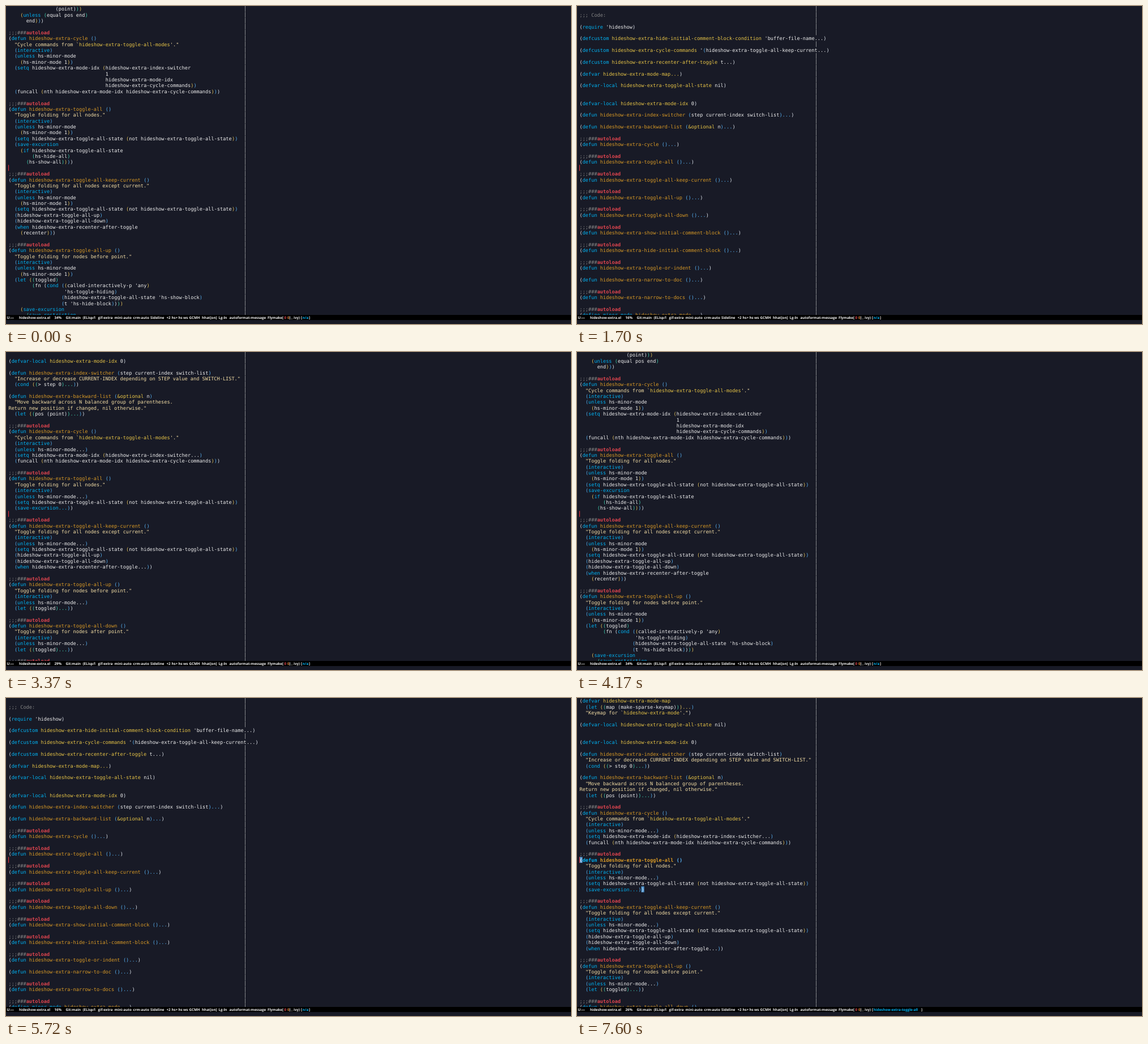
Write an HTML page that moves like this. It is 998x561 px and loops after 8 s.

```html
<!DOCTYPE html>
<html lang="en">
<head>
<meta charset="utf-8">
<title>Code folding</title>
<style>
html, body { margin: 0; width: 100%; height: 100%; overflow: hidden; background: #181a26; }
svg { display: block; width: 998px; height: 561px; }
text { white-space: pre; text-rendering: geometricPrecision; }
.code { font: 8.62px "DejaVu Sans Mono", "Noto Sans Mono", monospace; }
.mode { font: bold 6.2px "Open Sans", "Noto Sans", sans-serif; }
.bold { font-weight: bold; }
</style>
</head>
<body>
<svg id="stage" viewBox="0 0 998 561"></svg>
<script>
const CW = 5.19, LH = 10.385, X0 = 4.5, BASE = 8.4, ROWS = 53, LIMIT = 80;
const C = {
  text: '#eeeeee', key: '#00b3f4', fn: '#d99a26', name: '#e8c547', str: '#f5dfa6',
  note: '#858585', red: '#e0454f', match: '#4d94cf', rule: '#85888c'
};
const PARENS = ['#e2e8f0', '#58b2f4', '#e8c65c', '#3fd0ae'];
const KEYS = new Set(('defun defvar defvar-local defcustom define-minor-mode require interactive ' +
  'unless setq if let when cond save-excursion save-restriction').split(' '));

// In the listings "@" is the package prefix and "#" an autoload cookie line.
const listing = s => s.split('\n').map(l => l === '#' ? ';;;###autoload' : l.replace(/@/g, 'hideshow-extra'));

const full = listing(`                (point)))
    (unless (equal pos end)
      end)))

#
(defun @-cycle ()
  "Cycle commands from \`@-toggle-all-modes'."
  (interactive)
  (unless hs-minor-mode
    (hs-minor-mode 1))
  (setq @-mode-idx (@-index-switcher
                                 1
                                 @-mode-idx
                                 @-cycle-commands))
  (funcall (nth @-mode-idx @-cycle-commands)))

#
(defun @-toggle-all ()
  "Toggle folding for all nodes."
  (interactive)
  (unless hs-minor-mode
    (hs-minor-mode 1))
  (setq @-toggle-all-state (not @-toggle-all-state))
  (save-excursion
    (if @-toggle-all-state
        (hs-hide-all)
      (hs-show-all))))

#
(defun @-toggle-all-keep-current ()
  "Toggle folding for all nodes except current."
  (interactive)
  (unless hs-minor-mode
    (hs-minor-mode 1))
  (setq @-toggle-all-state (not @-toggle-all-state))
  (@-toggle-all-up)
  (@-toggle-all-down)
  (when @-recenter-after-toggle
    (recenter)))

#
(defun @-toggle-all-up ()
  "Toggle folding for nodes before point."
  (interactive)
  (unless hs-minor-mode
    (hs-minor-mode 1))
  (let ((toggled)
        (fn (cond ((called-interactively-p 'any)
                   'hs-toggle-hiding)
                  (@-toggle-all-state 'hs-show-block)
                  (t 'hs-hide-block))))
    (save-excursion
      (save-restriction`);

const folded = listing(`
;;; Code:

(require 'hideshow)

(defcustom @-hide-initial-comment-block-condition 'buffer-file-name...)

(defcustom @-cycle-commands '(@-toggle-all-keep-current...)

(defcustom @-recenter-after-toggle t...)

(defvar @-mode-map...)

(defvar-local @-toggle-all-state nil)


(defvar-local @-mode-idx 0)

(defun @-index-switcher (step current-index switch-list)...)

(defun @-backward-list (&optional n)...)

#
(defun @-cycle ()...)

#
(defun @-toggle-all ()...)

#
(defun @-toggle-all-keep-current ()...)

#
(defun @-toggle-all-up ()...)

#
(defun @-toggle-all-down ()...)

#
(defun @-show-initial-comment-block ()...)

#
(defun @-hide-initial-comment-block ()...)

#
(defun @-toggle-or-indent ()...)

(defun @-narrow-to-doc ()...)

#
(defun @-narrow-to-docs ()...)

#
(define-minor-mode @-mode...)`);

const partial = listing(`(defvar @-mode-map
  (let ((map (make-sparse-keymap)))...)
  "Keymap for \`@-mode'.")

(defvar-local @-toggle-all-state nil)


(defvar-local @-mode-idx 0)

(defun @-index-switcher (step current-index switch-list)
  "Increase or decrease CURRENT-INDEX depending on STEP value and SWITCH-LIST."
  (cond ((> step 0)...))

(defun @-backward-list (&optional n)
  "Move backward across N balanced group of parentheses.
Return new position if changed, nil otherwise."
  (let ((pos (point))...))

#
(defun @-cycle ()
  "Cycle commands from \`@-toggle-all-modes'."
  (interactive)
  (unless hs-minor-mode...)
  (setq @-mode-idx (@-index-switcher...)
  (funcall (nth @-mode-idx @-cycle-commands)))

#
(defun @-toggle-all ()
  "Toggle folding for all nodes."
  (interactive)
  (unless hs-minor-mode...)
  (setq @-toggle-all-state (not @-toggle-all-state))
  (save-excursion...))

#
(defun @-toggle-all-keep-current ()
  "Toggle folding for all nodes except current."
  (interactive)
  (unless hs-minor-mode...)
  (setq @-toggle-all-state (not @-toggle-all-state))
  (@-toggle-all-up)
  (@-toggle-all-down)
  (when @-recenter-after-toggle...))

#
(defun @-toggle-all-up ()
  "Toggle folding for nodes before point."
  (interactive)
  (unless hs-minor-mode...)
  (let ((toggled)...))

#
(defun @-toggle-all-down ()
  "Toggle folding for nodes after point."
  (interactive)
  (unless hs-minor-mode...)
  (let ((toggled)...))

#`);

const SVG = 'http://www.w3.org/2000/svg';
function add(parent, tag, attrs, text) {
  const el = document.createElementNS(SVG, tag);
  for (const k in attrs) el.setAttribute(k, attrs[k]);
  if (text) el.textContent = text;
  return parent.appendChild(el);
}
const rect = (g, x, y, width, height, fill) => add(g, 'rect', { x, y, width, height, fill });
const paren = depth => PARENS[depth % PARENS.length];

// Returns a function that splits successive lines into [column, text, colour, bold].
function highlighter(depth) {
  let inString = false;
  return line => {
    const out = [];
    let last = C.text, word = '';
    const put = (col, s, color, bold) => { out.push([col, s, color, bold]); last = color; };
    if (line.startsWith(';;;')) {
      const at = line.indexOf('autoload');
      put(0, at < 0 ? line : line.slice(0, at), C.note);
      if (at > 0) put(at, 'autoload', C.red, true);
      return out;
    }
    if (line[0] === '(') depth = 0;
    for (let i = 0; i < line.length;) {
      const rest = line.slice(i);
      let s;
      if (inString || rest[0] === '"') {
        const end = rest.indexOf('"', inString ? 0 : 1);
        s = end < 0 ? rest : rest.slice(0, end + 1);
        inString = end < 0;
        let col = i;
        for (const part of s.split(/(?<=`)|(?=')/)) {
          const quoted = line[col - 1] === '`';
          put(col, part, quoted ? C.name : C.str);
          col += part.length;
        }
      } else {
        s = rest.match(/^(\s+|\.\.\.|[()]|[^\s().]+|\.)/)[0];
        if (s === '(') put(i, s, paren(depth++));
        else if (s === ')') put(i, s, paren(depth = Math.max(0, depth - 1)));
        else if (s === '...') {
          put(i, s, last);
          depth = Math.max(line[0] === ' ' ? 2 : 1, rest.length - 3);
        } else if (s.trim()) {
          put(i, s, KEYS.has(s) ? C.key
            : /^defun|^define/.test(word) ? C.fn
            : /^def/.test(word) || s[0] === '&' ? C.name : C.text);
          word = s;
        }
      }
      i += s.length;
    }
    return out;
  };
}

function modeLine(g, percent, place) {
  rect(g, 0, 545, 998, 9, '#000');
  const label = (x, s, fill = '#f4f4f4') => add(g, 'text', { x, y: 552, fill, class: 'mode' }, s);
  const words = { 1.5: 'U:—', 23: 'hideshow-extra.el', 85.5: percent + '%', 105.5: 'Git:main',
    135.5: '(ELisp/l', 162.5: 'gif-extra', 191.5: 'mini-auto', 224.5: 'crm-auto', 255: 'Sideline',
    283.5: '+2', 292.5: 'hs+', 304.5: 'hs', 313: 'ws', 323.5: 'GCMH', 346: 'hhat[on]',
    375.5: 'Lg-ln', 394.5: 'autoformat-message', 462: 'Flymake[', 500.5: '] ,', 508: 'ivy)', 521: '[' };
  for (const x in words) label(x, words[x]);
  label(491.5, '0', C.red);
  label(497, '0', '#e58a3c');
  label(523.8, place, C.key);
  label(place === 'n/a' ? 535 : 608, ']');
}

function screen(lines, { depth = 0, percent, cursor = 27, close, place = 'n/a' }) {
  const g = add(stage, 'g', { display: 'none' });
  const parse = highlighter(depth);
  const cell = ([row, col]) => rect(g, X0 + col * CW, row * LH, CW, LH, C.match);
  if (close) { cell([cursor, 0]); cell(close); }
  for (let row = 0; row < ROWS; row++) {
    const line = lines[row] || '', top = row * LH;
    for (const [col, s, fill, bold] of parse(line)) {
      const strong = bold || close && row === cursor;
      add(g, 'text', { x: X0 + col * CW, y: top + BASE, fill, class: strong ? 'code bold' : 'code' }, s);
    }
    if (line.length <= LIMIT) rect(g, 422, top, 1, LH - 0.4, C.rule);
  }
  rect(g, 4, cursor * LH, 1.1, LH, '#e8343f');
  modeLine(g, percent, place);
  rect(g, 0, 554, 998, 7, '#181a26');
  return g;
}

const stage = document.getElementById('stage');
rect(stage, 0, 0, 998, 561, '#181a26');
const here = 'hideshow-extra-toggle-all';
const open = screen(full, { depth: 4, percent: 34 });
const shut = screen(folded, { percent: 16 });
const half = screen(partial.slice(6), { percent: 29 });
const shutAt = screen(folded, { percent: 16, cursor: 26, close: [26, 38], place: here });
const halfAt = screen(partial, { percent: 26, close: [32, 21], place: here });

const LOOP = 8000;
const cues = [[0, open], [1000, shut], [2170, half], [4170, open], [5720, shut], [6740, shutAt], [7600, halfAt]];
let shown;
function draw(t) {
  const next = cues.filter(c => c[0] <= t).pop()[1];
  if (next === shown) return;
  if (shown) shown.setAttribute('display', 'none');
  next.removeAttribute('display');
  shown = next;
}
const start = performance.now();
function tick() {
  draw((performance.now() - start) % LOOP);
  requestAnimationFrame(tick);
}
draw(0);
requestAnimationFrame(tick);
</script>
</body>
</html>
```
